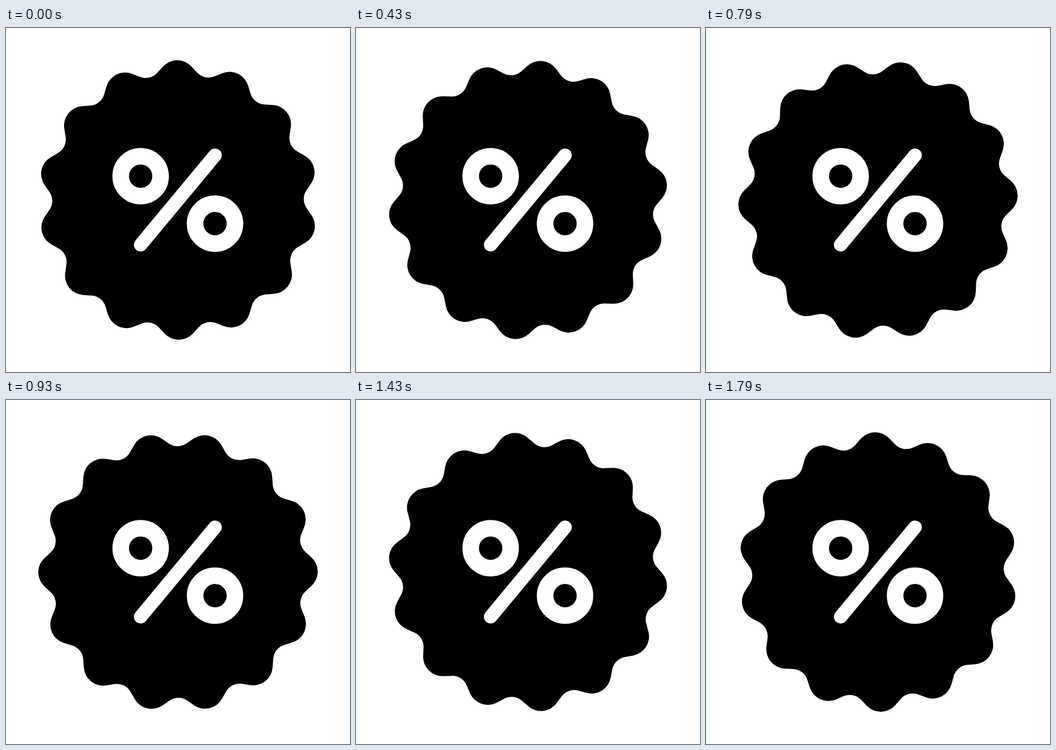
An HTML page for the animation above (1870 ms loop, 640 by 640 pixels).

```html
<!DOCTYPE html>
<html lang="en">
<head>
<meta charset="utf-8">
<title>Discount badge</title>
<style>
  html, body { margin: 0; width: 100%; height: 100%; overflow: hidden; background: #fff; }
  svg { display: block; width: 100%; height: 100%; }
</style>
</head>
<body>
<svg viewBox="0 0 640 640">
  <path id="badge"/>
  <g fill="none" stroke="#fff">
    <circle cx="250.5" cy="275.7" r="37.1" stroke-width="30.8"/>
    <circle cx="388.9" cy="364" r="37.1" stroke-width="30.8"/>
    <path d="M388.9 236.8L250.5 403.2" stroke-width="25.2" stroke-linecap="round"/>
  </g>
</svg>
<script>
const LOOP = 1870, FPS = 14, TEETH = 14;
const TIP = { dist: 224, r: 36 };      // convex arcs
const GAP = { dist: 263, r: 29 };      // concave arcs
const badge = document.getElementById('badge');

// Scalloped outline: arcs joined by their inner common tangents.
function outline() {
  const step = 2 * Math.PI / TEETH;
  const gx = GAP.dist * Math.sin(step / 2);
  const gy = GAP.dist * Math.cos(step / 2);
  const dy = gy - TIP.dist;
  const normal = Math.atan2(dy, gx) + Math.acos((TIP.r + GAP.r) / Math.hypot(gx, dy));
  const nx = Math.cos(normal), ny = Math.sin(normal);
  const polar = (x, y) => ({ a: Math.atan2(x, y), d: Math.hypot(x, y) });
  const tip = polar(TIP.r * nx, TIP.dist + TIP.r * ny);
  const gap = polar(gx - GAP.r * nx, gy - GAP.r * ny);
  const at = (a, d) => `${(d * Math.sin(a)).toFixed(2)} ${(-d * Math.cos(a)).toFixed(2)}`;

  let d = '';
  for (let i = 0; i < TEETH; i++) {
    const a = i * step;
    d += (i ? 'L' : 'M') + at(a - tip.a, tip.d)
      + `A${TIP.r} ${TIP.r} 0 0 1 ` + at(a + tip.a, tip.d)
      + 'L' + at(a + gap.a, gap.d)
      + `A${GAP.r} ${GAP.r} 0 0 0 ` + at(a + step - gap.a, gap.d);
  }
  return d + 'Z';
}

// The turn advances in held steps; the loop opens on its closing pose.
function draw(ms) {
  const t = Math.floor((ms % LOOP) / 10) * 10 + 5;
  const i = Math.min(25, Math.floor(t * FPS / 1000)) || 26;
  badge.setAttribute('transform', `translate(320 320) rotate(${0.08 + 0.972 * i})`);
}

badge.setAttribute('d', outline());
const start = performance.now();
function tick() {
  draw(performance.now() - start);
  requestAnimationFrame(tick);
}
tick();
</script>
</body>
</html>
```
